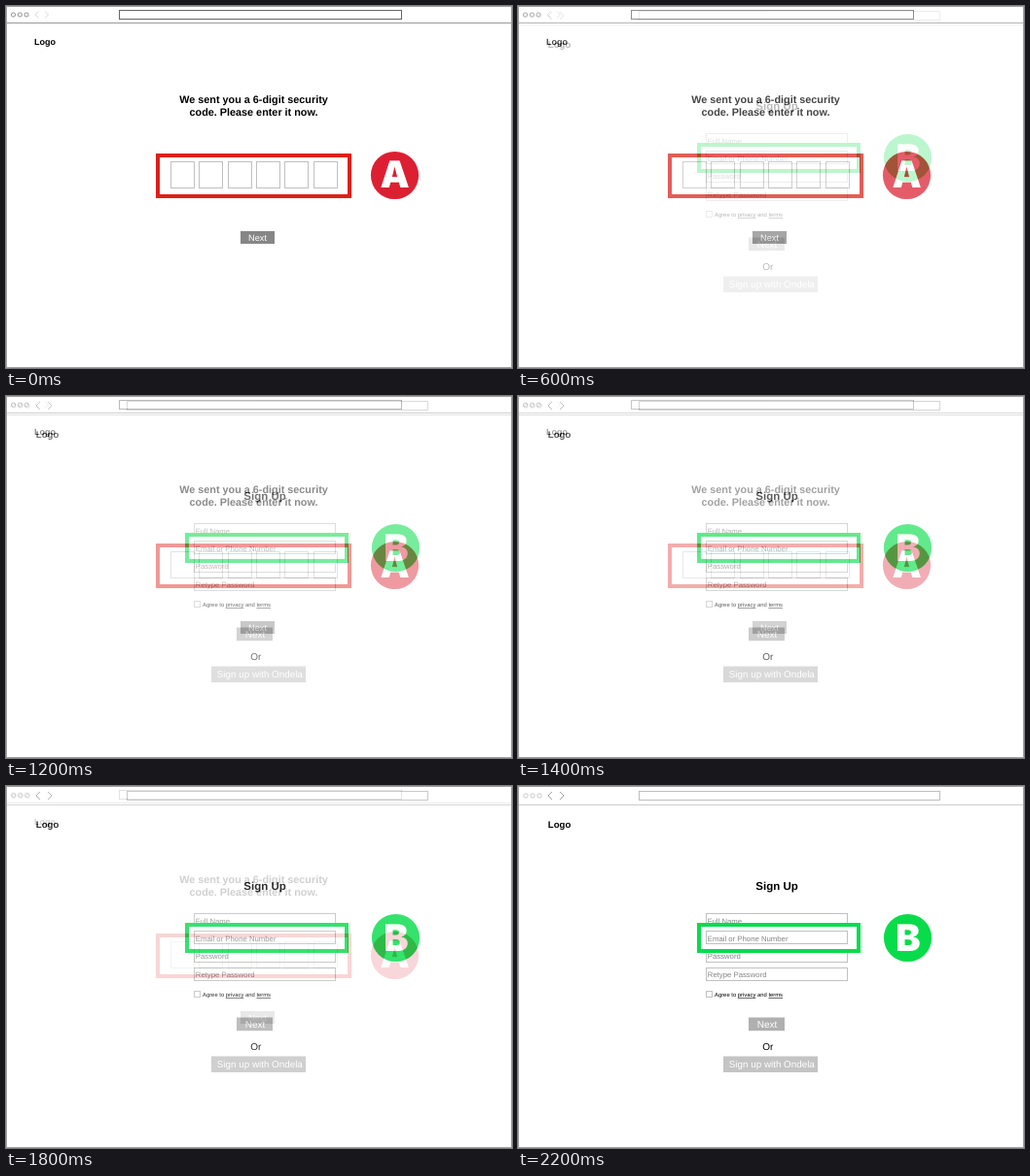
Recreate the animation shown at these times as an HTML page. Size 520x373 px, loop 2400 ms.

```html
<!DOCTYPE html>
<html lang="en">
<head>
<meta charset="utf-8">
<title>Sign-up steps</title>
<style>
  html, body { margin: 0; width: 100%; height: 100%; overflow: hidden; background: #fff; }
  svg { display: block; width: 520px; height: 373px; }
  text { font-family: "Liberation Sans", Arial, sans-serif; text-rendering: geometricPrecision; }
  .bold { font-weight: 700; }
  .mid { text-anchor: middle; }
  .badge { font: 900 38px Inter, sans-serif; fill: #fff; text-anchor: middle; }
  .line { fill: none; stroke: #c0c0c0; }
  .hint { font-size: 7.75px; fill: #858585; }
  .link { text-decoration: underline; }
</style>
</head>
<body>
<svg viewBox="0 0 520 373">
  <g id="code">
    <rect width="520" height="373" fill="#fff"/>
    <g fill="none">
      <path d="M0 17.5H520" stroke="#999"/>
      <rect x="116.5" y="4.5" width="290" height="9" stroke="#666"/>
      <g stroke="#777" stroke-width=".8">
        <circle cx="7.5" cy="9" r="2.1"/><circle cx="14.3" cy="9" r="2.1"/><circle cx="21" cy="9" r="2.1"/>
      </g>
      <path d="M33.5 5.5L30 9l3.5 3.5M40 5.5L43.500 9 40 12.500" stroke="#d4d4d4" stroke-width=".9"/>
    </g>
    <text class="bold" x="29" y="39.700" font-size="9">Logo</text>
    <g class="bold mid" font-size="10.84">
      <text x="254.500" y="99.500">We sent you a 6-digit security</text>
      <text x="254.500" y="112.500">code. Please enter it now.</text>
    </g>
    <g id="digits" class="line"></g>
    <rect x="156" y="154" width="197" height="42" fill="none" stroke="#dc201b" stroke-width="4"/>
    <circle cx="399.500" cy="174.500" r="24.600" fill="#dc2032"/>
    <text class="badge" x="399.500" y="187">A</text>
    <rect x="241" y="232" width="35" height="13" fill="#868686"/>
    <text class="mid" x="258.500" y="241.700" font-size="9.200" fill="#fff">Next</text>
  </g>

  <g id="signup" opacity="0">
    <rect width="520" height="373" fill="#fff"/>
    <g fill="none">
      <path d="M0 19.5H520" stroke="#ccc"/>
      <rect x="124.500" y="5.500" width="309" height="9" stroke="#bdbdbd"/>
      <g stroke="#bbb" stroke-width=".8">
        <circle cx="8" cy="10" r="2.200"/><circle cx="15" cy="10" r="2.200"/><circle cx="22" cy="10" r="2.200"/>
      </g>
      <path d="M35 6L31 10l4 4M43 6l4 4-4 4" stroke="#999" stroke-width=".9"/>
    </g>
    <text class="bold" x="30.800" y="43.300" font-size="9.600">Logo</text>
    <text class="bold mid" x="266" y="107" font-size="11.500">Sign Up</text>
    <g id="fields"></g>
    <rect x="186" y="143" width="164" height="27" fill="none" stroke="#08dc4b" stroke-width="4"/>
    <circle cx="400.500" cy="156.500" r="24.600" fill="#08dc4b"/>
    <text class="badge" x="401" y="169.800">B</text>
    <rect class="line" x="193.500" y="211.500" width="6" height="6"/>
    <text x="202" y="217" font-size="5.870">Agree to <tspan class="link">privacy</tspan> and <tspan class="link">terms</tspan></text>
    <rect x="237" y="238.500" width="37" height="13.700" fill="#b0b0b0"/>
    <text class="mid" x="256" y="249" font-size="10" fill="#fff">Next</text>
    <text class="mid" x="256.800" y="272" font-size="10">Or</text>
    <rect x="211" y="278.500" width="97" height="16.500" fill="#c4c4c4"/>
    <text class="mid" x="260.800" y="290.200" font-size="9.830" fill="#fff">Sign up with Ondela</text>
  </g>

  <rect x=".5" y=".5" width="519" height="372" fill="none" stroke="#a0a0a0"/>
</svg>
<script>
  const $ = id => document.getElementById(id);

  $("digits").innerHTML = Array.from({ length: 6 }, (_, i) =>
    `<rect x="${Math.round(169 + i * 29.3) + 0.5}" y="160.5" width="24" height="27"/>`).join("");

  const fields = [
    ["Full Name", 131.5, 141.5],
    ["Email or Phone Number", 149.5, 159.5],
    ["Password", 168.5, 178],
    ["Retype Password", 187.5, 197]
  ];
  $("fields").innerHTML = fields.map(([label, top, base]) =>
    `<rect class="line" x="193.5" y="${top}" width="145" height="13"/>
     <text class="hint" x="194.8" y="${base}">${label}</text>`).join("");

  // Twelve held poses, from fully hidden to fully shown
  $("signup").animate({ opacity: [0, 1] }, {
    duration: 2400, iterations: Infinity, easing: "steps(12, jump-none)"
  });
</script>
</body>
</html>
```
